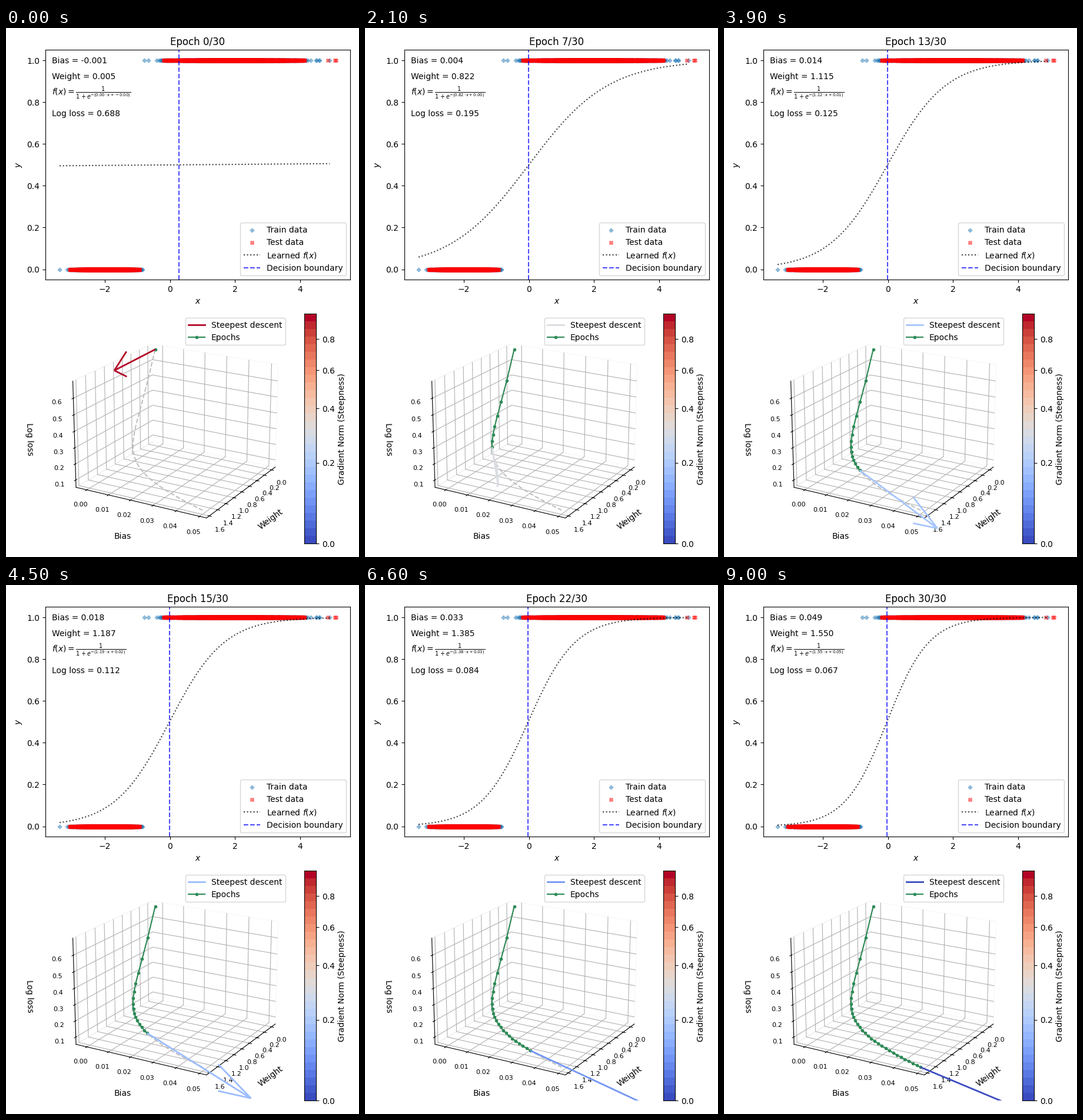
Write a matplotlib script that moves like this. It is 600 px wide and 900 px high and loops after 9300 ms.

```python
import numpy as np
import matplotlib.pyplot as plt
from matplotlib.animation import FuncAnimation
from matplotlib.lines import Line2D

W, H, DPI = 600, 900, 100
EPOCHS = 30
RATE = 0.2
TOP, BOTTOM = 37.3, 428.3


def rect(left, top, right, bottom):
    return [left / W, (H - bottom) / H, (right - left) / W, (bottom - top) / H]


def through(x, xk, yk):
    """Polynomial through a few key points."""
    return np.polyval(np.polyfit(xk, yk, len(xk) - 1), x)


def padded(v, margin):
    """Limits with a data margin plus the 1/48 view margin of 3D axes."""
    lo, hi = v.min(), v.max()
    pad = ((1 + 2 * margin) * 25 / 24 - 1) / 2 * (hi - lo)
    return lo - pad, hi + pad


# Training history: weight in log time, bias in time, log of the loss in weight
key = np.array([0, 3, 10, 19, 30])
key_w = [.0049, .486, .987, 1.308, 1.550]
epoch = np.arange(EPOCHS + 2)
weight = through(np.log1p(epoch), np.log1p(key), key_w)
bias = through(epoch, key, [-.00135, -.0001, .0086, .0262, .0492])
loss = np.exp(through(weight, key_w, np.log([.688, .330, .151, .0941, .067])))
step_w, step_b = np.diff(weight), np.diff(bias)
grad = np.hypot(step_w, step_b) / RATE
weight, bias, loss = weight[:-1], bias[:-1], loss[:-1]
g_min, g_max = grad.min(), grad.max()
cmap = plt.get_cmap("coolwarm")


def level(g):
    return np.sqrt(np.clip((g - g_min) / (g_max - g_min), 0, 1))


rng = np.random.default_rng(4)


def blob(mean, sd, n, lo, hi, *far):
    x = rng.normal(mean, sd, n)
    return np.concatenate([x[(x > lo) & (x < hi)], far])


def classes(neg, pos):
    return np.concatenate([neg, pos]), np.repeat([0, 1], [len(neg), len(pos)])


train = classes(blob(-1.95, .42, 1000, -3.15, -.84, -3.39),
                blob(2, 1, 1000, -.5, 4.6, -.78, -.67, 4.91))
test = classes(blob(-1.95, .42, 2500, -3.08, -.93),
               blob(2, 1, 2500, -.2, 4.15, 4.85, 5.06, 5.11))

fig = plt.figure(figsize=(W / DPI, H / DPI), dpi=DPI, facecolor="white")

# Data and learned curve
ax = fig.add_axes(rect(67, TOP, 585, BOTTOM))
dots = dict(s=20, alpha=.4, linewidths=1)
ax.scatter(*train, marker="P", color="tab:blue", label="Train data", **dots)
ax.scatter(*test, marker="X", color="red", label="Test data", **dots)
xs = np.linspace(-3.39, 4.91, 200)
curve, = ax.plot(xs, xs * 0, "k:", alpha=.75, label="Learned $f(x)$")
boundary = ax.axvline(0, color="blue", ls="--", alpha=.7, label="Decision boundary")
ax.set(xlim=(-3.825, 5.536), ylim=(-.05, 1.05), xlabel="$x$", ylabel="$y$")
ax.legend(loc="lower right")
title = ax.set_title("")
notes = [ax.text(.021, (BOTTOM - y) / (BOTTOM - TOP), "", transform=ax.transAxes)
         for y in (60, 87, 114, 150)]

# Loss path in parameter space
ax3 = fig.add_axes(rect(91, 486.3, 482, 877.3), projection="3d")
ax3.patch.set_visible(False)
ax3.view_init(elev=20, azim=30)
ax3.plot(weight, bias, loss, "--", color="silver")
path, = ax3.plot([], [], [], ".-", color="seagreen")
ax3.set_xlim(*padded(weight, .05))
ax3.set_ylim(*padded(bias, .05))
ax3.set_zlim(*padded(loss, 0))
ax3.set_xticks(np.linspace(0, 1.6, 9))
ax3.set_yticks(np.linspace(0, .05, 6))
ax3.set_zticks(np.linspace(.1, .6, 6))
ax3.set_xlabel("Weight", labelpad=10)
ax3.set_ylabel("Bias", labelpad=10)
ax3.set_zlabel("Log loss", labelpad=10)
ax3.tick_params(labelsize=8)
for axis in (ax3.xaxis, ax3.yaxis, ax3.zaxis):
    axis.pane.set_fill(False)
legend = ax3.legend(handles=[
    Line2D([], [], lw=2, label="Steepest descent"),
    Line2D([], [], marker=".", color="seagreen", label="Epochs")], loc="upper right")
steep_key = legend.get_lines()[0]

# Colour scale
bar = fig.add_axes(rect(507.4, 486.3, 527, 877.3))
bar.imshow(np.linspace(0, 1, 30)[:, None], cmap=cmap, origin="lower",
           extent=(0, 1, 0, 1), aspect="auto", interpolation="nearest")
marks = np.arange(5) * .2
bar.set_xticks([])
bar.yaxis.tick_right()
bar.yaxis.set_label_position("right")
bar.set_yticks(level(marks), [f"{m:.1f}" for m in marks])
bar.set_ylabel("Gradient Norm (Steepness)")

arrow = None


def update(n):
    global arrow
    w, b = weight[n], bias[n]
    title.set_text(f"Epoch {n}/{EPOCHS}")
    lines = (f"Bias = {b:.3f}", f"Weight = {w:.3f}",
             r"$f(x)=\frac{1}{1+e^{-(%.2f \cdot x + %.2f)}}$" % (w, b),
             f"Log loss = {loss[n]:.3f}")
    for note, line in zip(notes, lines):
        note.set_text(line)
    curve.set_ydata(1 / (1 + np.exp(-(w * xs + b))))
    boundary.set_xdata([-b / w] * 2)

    path.set_data_3d(weight[:n + 1], bias[:n + 1], loss[:n + 1])
    if arrow is not None:
        arrow.remove()
    color = cmap(float(level(grad[n])))
    arrow = ax3.quiver(w, b, loss[n], step_w[n], step_b[n], 0,
                       length=1, normalize=True, color=color, lw=2)
    steep_key.set_color(color)
    return []


anim = FuncAnimation(fig, update, frames=EPOCHS + 1, interval=300,
                     init_func=lambda: [], repeat=True, repeat_delay=0, blit=False)
plt.show()
```
